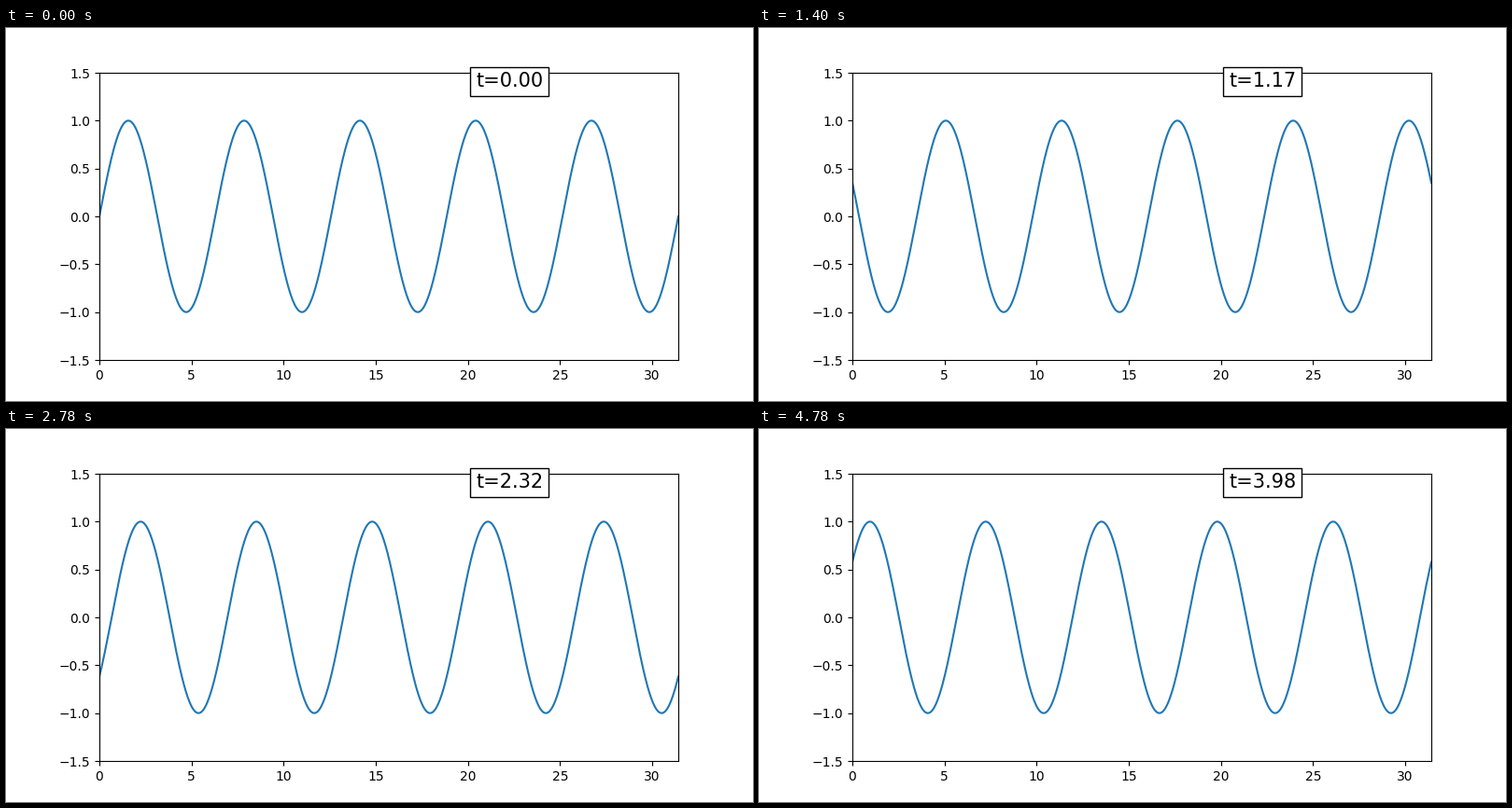
These frames come from a looping animation (800x400 px, 4.8 s). A matplotlib script:

```python
import numpy as np
import matplotlib.pyplot as plt
from matplotlib.animation import FuncAnimation

FPS = 60          # simulated time steps per unit of t
FRAMES = 240
INTERVAL = 20     # ms
OMEGA = 3.0

fig, ax = plt.subplots(figsize=(8, 4), dpi=100)
x = np.linspace(0, 10 * np.pi, 1000)
line, = ax.plot(x, np.sin(x))
ax.set_xlim(0, 10 * np.pi)
ax.set_ylim(-1.5, 1.5)
label = ax.text(0.65, 0.95, "t=0.00", transform=ax.transAxes, fontsize=15,
                bbox=dict(facecolor="white", edgecolor="black"))


def update(i):
    t = i / FPS
    line.set_ydata(np.sin(x - OMEGA * t))
    label.set_text(f"t={t:.2f}")
    return line, label


anim = FuncAnimation(fig, update, frames=FRAMES, interval=INTERVAL,
                     repeat=True, repeat_delay=0)
plt.show()
```
